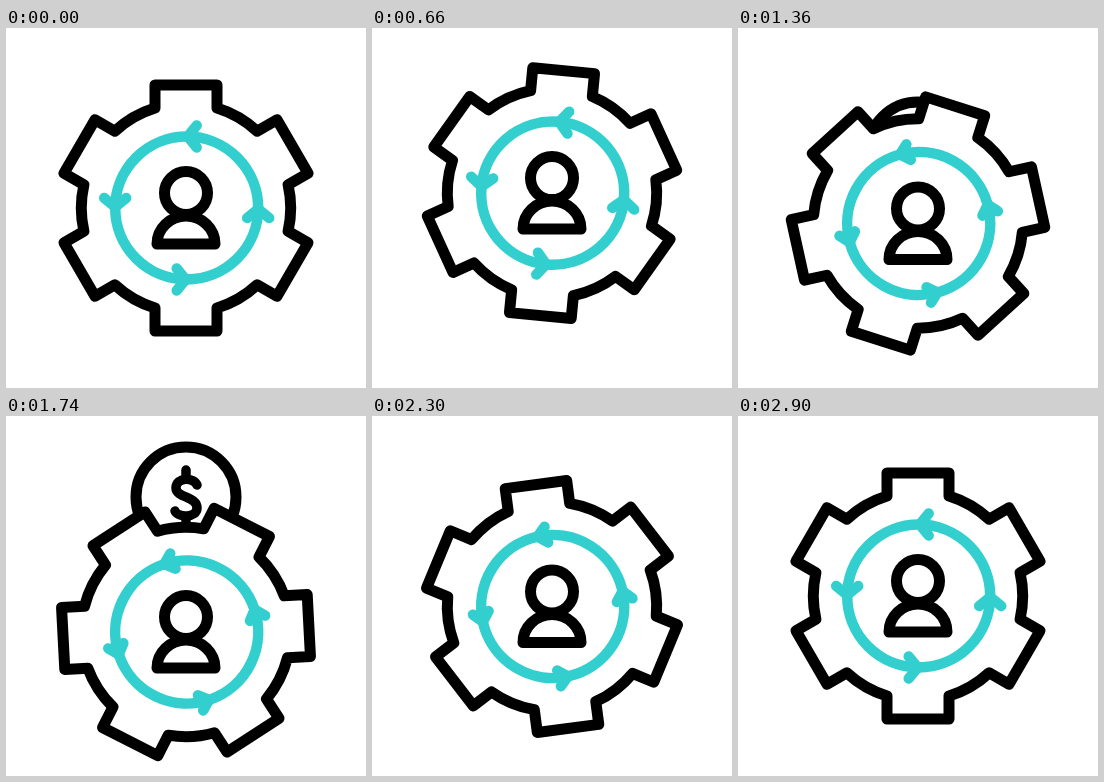
These frames come from a looping animation (360 by 360 pixels, 3.28 s). An HTML page:

```html
<!DOCTYPE html>
<html lang="en">
<head>
<meta charset="utf-8">
<title>Gear and coin</title>
<style>
  html, body { margin: 0; width: 100%; height: 100%; overflow: hidden; background: #fff; }
  svg { display: block; width: 100vw; height: 100vh; }
  .ink { fill: #fff; stroke: #000; stroke-width: 11; stroke-linecap: round; stroke-linejoin: round; }
  .teal { fill: none; stroke: #33cfcf; stroke-width: 10.5; stroke-linecap: round; stroke-linejoin: round; }
  #dollar { fill: none; stroke-width: 9.5; }
</style>
</head>
<body>
<svg viewBox="0 0 360 360">
  <g id="coin" class="ink">
    <circle r="50"/>
    <path id="dollar" d="M11-12C8-20-10-20-10-9C-10 1 11-1 11 11C11 21-8 21-11 14M0-27V-18M0 19V27"/>
  </g>
  <g id="body">
    <path id="gear" class="ink"/>
    <g id="ring" class="teal">
      <circle r="71.5"/>
      <path id="arrows"/>
    </g>
    <g class="ink">
      <path d="M-29 36A29 28 0 0 1 29 36Z"/>
      <circle cy="-15" r="21.5"/>
    </g>
  </g>
</svg>
<script>
const LOOP = 3280, STEP = 20;
const $ = id => document.getElementById(id);

// Keys are [time in ms, value]
const tracks = {
  y: [[300, 0], [680, -15], [980, -6], [1360, 15.5], [1740, 36], [1940, 43], [2300, 10.5], [2600, -9], [2900, 0]],
  gear: [[300, 0], [640, 5.5], [980, -6.3], [1360, -42.4], [1740, -93], [1940, -112], [2300, -127.5], [2480, -130], [2900, -120]],
  ring: [[300, 0], [660, 4.5], [980, -12], [1360, -16], [1740, -19], [2300, -13], [2900, 0]],
  spread: [[660, 11], [980, 8], [2300, 8], [2900, 11]],
  coin: [[860, 180], [1360, 124], [1740, 81], [1920, 70], [2040, 61], [2300, 165], [2460, 180]]
};

// Smooth curve through the keys without extra overshoot
function sample(keys, t) {
  const last = keys.length - 1;
  if (t <= keys[0][0]) return keys[0][1];
  if (t >= keys[last][0]) return keys[last][1];
  const slope = i => (keys[i + 1][1] - keys[i][1]) / (keys[i + 1][0] - keys[i][0]);
  const tangent = i => {
    if (i === 0 || i === last) return 0;
    const a = slope(i - 1), b = slope(i);
    return a * b <= 0 ? 0 : 2 * a * b / (a + b);
  };
  const i = keys.findIndex(k => k[0] > t) - 1;
  const [t0, v0] = keys[i], [t1, v1] = keys[i + 1];
  const h = t1 - t0, u = (t - t0) / h, w = 1 - u;
  return w * w * ((1 + 2 * u) * v0 + u * h * tangent(i)) +
         u * u * ((3 - 2 * u) * v1 - w * h * tangent(i + 1));
}

function turn([x, y], deg) {
  const a = deg * Math.PI / 180, c = Math.cos(a), s = Math.sin(a);
  return [x * c - y * s, x * s + y * c].map(n => n.toFixed(2)).join(' ');
}

function gearPath() {
  let d = '';
  for (let a = 0; a < 360; a += 60) {
    const p = (x, y) => turn([x, y], a);
    d += (a ? 'A105 105 0 0 1 ' : 'M') + p(-31, -100) +
      'L' + p(-31, -123) + 'L' + p(31, -123) + 'L' + p(31, -100);
  }
  return d + 'A105 105 0 0 1 -31 -100Z';
}

function arrowPath(spread) {
  let d = '';
  for (let a = 0; a < 360; a += 90) {
    const p = (x, y) => turn([x, y], a);
    d += 'M' + p(71.5 - spread, 10) + 'L' + p(71.5, 1) + 'L' + p(71.5 + spread, 10);
  }
  return d;
}

function draw(now) {
  const t = Math.floor(now % LOOP / STEP) * STEP;
  const at = name => sample(tracks[name], t);
  $('body').setAttribute('transform', `translate(180 ${180 + at('y')})`);
  $('gear').setAttribute('transform', `rotate(${at('gear')})`);
  $('ring').setAttribute('transform', `translate(.7 0) rotate(${at('ring')})`);
  $('arrows').setAttribute('d', arrowPath(at('spread')));
  $('coin').setAttribute('transform', `translate(180 ${at('coin')})`);
}

$('gear').setAttribute('d', gearPath());
const start = performance.now();
function loop() {
  draw(performance.now() - start);
  requestAnimationFrame(loop);
}
loop();
</script>
</body>
</html>
```
